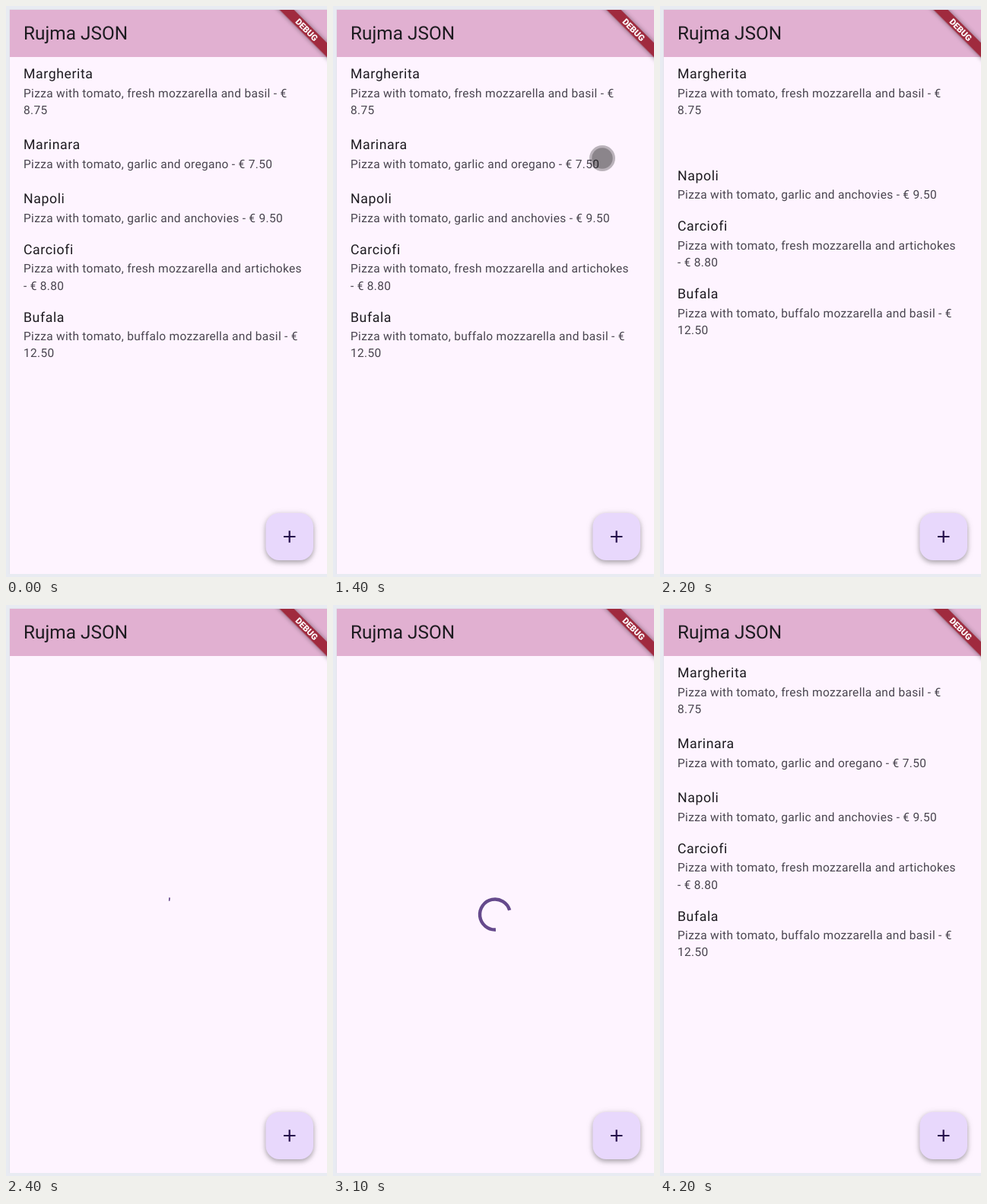
Recreate the animation shown at these times as an HTML page. Size 422 px wide and 750 px high, loop 4300 ms.

```html
<!DOCTYPE html>
<html lang="en">
<head>
<meta charset="utf-8">
<title>Pizza list</title>
<style>
  html, body { margin: 0; width: 100%; height: 100%; overflow: hidden; background: #e8ebf2; }
  svg { display: block; width: 422px; height: 750px; font-family: Roboto, Arial, sans-serif; text-rendering: geometricPrecision; }
  .bar { font-size: 24.4px; fill: #1d1b20; }
  .name { font-size: 17.78px; letter-spacing: .555px; fill: #1d1b20; }
  .info { font-size: 15.56px; letter-spacing: .278px; fill: #49454f; }
  .tag { font-size: 11.3px; font-weight: 900; fill: #fff; text-anchor: middle; }
  .fab { filter: drop-shadow(0 3px 3px rgba(0, 0, 0, .26)) drop-shadow(0 1px 4px rgba(0, 0, 0, .12)); }
  .ribbon { filter: drop-shadow(0 0 3px rgba(0, 0, 0, .45)); }
</style>
</head>
<body>
<svg viewBox="0 0 422 750">
  <defs>
    <clipPath id="panel"><rect x="5" y="5" width="417" height="741"/></clipPath>
  </defs>
  <rect width="422" height="750" fill="#e8ebf2"/>
  <rect x="4.5" y="4.5" width="418" height="741.5" fill="#dcdde6"/>
  <g clip-path="url(#panel)">
    <rect x="5" y="5" width="417" height="741" fill="#fef4ff"/>
    <g id="list"></g>
    <path id="spinner" fill="none" stroke="#65498c" stroke-width="4.4"/>
    <rect x="5" y="5" width="417" height="62" fill="#e1b0d1"/>
    <text class="bar" x="23" y="43.7">Rujma JSON</text>
    <g class="fab"><rect x="341.5" y="666" width="62.5" height="62" rx="17.8" fill="#e8d8fc"/></g>
    <path d="M365 697h15.5M372.7 689.2v15.6" stroke="#25104b" stroke-width="2.2"/>
    <g transform="translate(422 4.5) rotate(45)">
      <rect class="ribbon" x="-60" y="31.1" width="120" height="13.3" fill="#a02a3e"/>
      <text class="tag" x="0" y="41.8">DEBUG</text>
    </g>
  </g>
  <g id="touch" fill="#000">
    <circle r="17" fill-opacity=".27"/>
    <circle r="13.7" fill-opacity=".25"/>
  </g>
</svg>
<script>
const LOOP = 4300, STEP = 100;
const SPIN_ON = 2400, SPIN_OFF = 3200, SPIN_START = 2344;
const DRAG_FROM = 354, GONE = -500;

const menu = [
  [95, "Margherita", "Pizza with tomato, fresh mozzarella and basil - €", "8.75"],
  [188.4, "Marinara", "Pizza with tomato, garlic and oregano - € 7.50"],
  [259.4, "Napoli", "Pizza with tomato, garlic and anchovies - € 9.50"],
  [325.9, "Carciofi", "Pizza with tomato, fresh mozzarella and artichokes", "- € 8.80"],
  [414.6, "Bufala", "Pizza with tomato, buffalo mozzarella and basil - €", "12.50"]
];

// [time, value] steps, each held until the next
const touchX = [[0, null], [900, 403], [1000, 393], [1400, 354], [1500, 333], [1600, 293],
  [1700, 229.3], [1800, 17], [1900, null]];
const collapse = [[0, 0], [2200, -30.5], [2300, -68], [SPIN_OFF, 0]];

const $ = id => document.getElementById(id);
const list = $("list"), spinner = $("spinner"), touch = $("touch");

function add(parent, tag, attrs, text) {
  const el = document.createElementNS("http://www.w3.org/2000/svg", tag);
  for (const key in attrs) el.setAttribute(key, attrs[key]);
  if (text) el.textContent = text;
  return parent.appendChild(el);
}

const rows = menu.map(([y, name, ...lines]) => {
  const row = add(list, "g", {});
  add(row, "text", { class: "name", x: 23, y }, name);
  lines.forEach((line, i) =>
    add(row, "text", { class: "info", x: 23, y: y + 24.5 + i * 22.2 }, line));
  return row;
});

function held(steps, t) {
  let value = steps[0][1];
  for (const [at, v] of steps) if (t >= at) value = v;
  return value;
}

// cubic-bezier(.4, 0, .2, 1) solved by bisection
function fastOutSlowIn(x) {
  if (x <= 0) return 0;
  if (x >= 1) return 1;
  let lo = 0, hi = 1, u = .5;
  for (let i = 0; i < 24; i++) {
    u = (lo + hi) / 2;
    const bx = 1.2 * u * (1 - u) ** 2 + .6 * u * u * (1 - u) + u ** 3;
    if (bx < x) lo = u; else hi = u;
  }
  return u * u * (3 - 2 * u);
}

function arc(age) {
  const phase = age / 1333 % 1;
  const head = fastOutSlowIn(phase * 2), tail = fastOutSlowIn(phase * 2 - 1);
  const start = -100 + tail * 270 + age / 2222 * 360 + phase * 90;
  const sweep = Math.max((head - tail) * 270, .1);
  const point = deg => {
    const a = deg * Math.PI / 180;
    return `${213 + 20 * Math.cos(a)} ${406.5 + 20 * Math.sin(a)}`;
  };
  return `M${point(start)}A20 20 0 ${sweep > 180 ? 1 : 0} 1 ${point(start + sweep)}`;
}

const show = (el, on) => el.setAttribute("visibility", on ? "visible" : "hidden");
const move = (el, x, y) => el.setAttribute("transform", `translate(${x} ${y})`);

function draw(now) {
  const t = Math.floor(now % LOOP / STEP) * STEP;
  const x = held(touchX, t);
  show(touch, x !== null);
  if (x !== null) move(touch, x, 200);

  const swiped = t >= 1900 && t < SPIN_OFF;
  const drag = swiped ? GONE : x === null ? 0 : Math.min(0, x - DRAG_FROM);
  const lift = held(collapse, t);
  rows.forEach((row, i) => move(row, i === 1 ? drag : 0, i > 1 ? lift : 0));

  const loading = t >= SPIN_ON && t < SPIN_OFF;
  show(list, !loading);
  show(spinner, loading);
  if (loading) spinner.setAttribute("d", arc(t - SPIN_START));
}

const begin = performance.now();
function tick() {
  draw(performance.now() - begin);
  requestAnimationFrame(tick);
}
tick();
</script>
</body>
</html>
```
